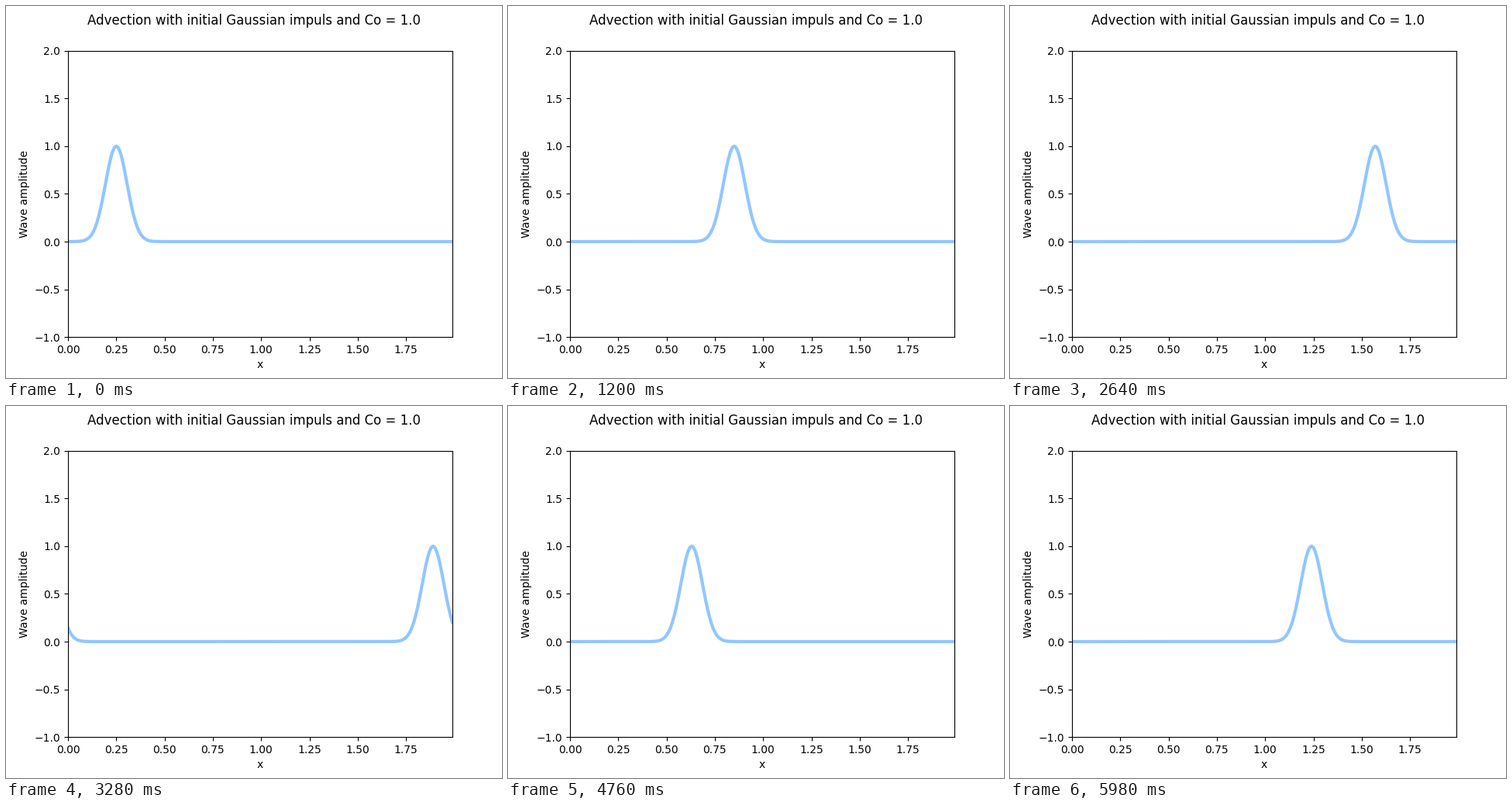
A matplotlib script for the animation above (6000 ms loop, 640x480 px).

```python
import numpy as np
import matplotlib.pyplot as plt
from matplotlib.animation import FuncAnimation

FRAMES = 300
INTERVAL = 20      # ms
LENGTH = 2.0       # periodic domain
DX = 0.01
CENTER = 0.25
DECAY = 160

plt.rcParams["font.family"] = "DejaVu Sans"

x = np.arange(round(LENGTH / DX)) * DX
impulse = np.exp(-DECAY * (x - CENTER) ** 2)

fig, ax = plt.subplots(figsize=(6.4, 4.8), dpi=100)
fig.suptitle("Advection with initial Gaussian impuls and Co = 1.0")
ax.set(xlim=(0, x[-1]), ylim=(-1, 2), xlabel="x", ylabel="Wave amplitude")
line, = ax.plot(x, impulse, color="#92C6FF", lw=3)


def update(step):
    # At Courant number 1 the wave moves exactly one cell per step.
    line.set_ydata(np.roll(impulse, step))
    return line,


anim = FuncAnimation(fig, update, frames=FRAMES, interval=INTERVAL,
                     repeat=True, repeat_delay=0)
plt.show()
```
